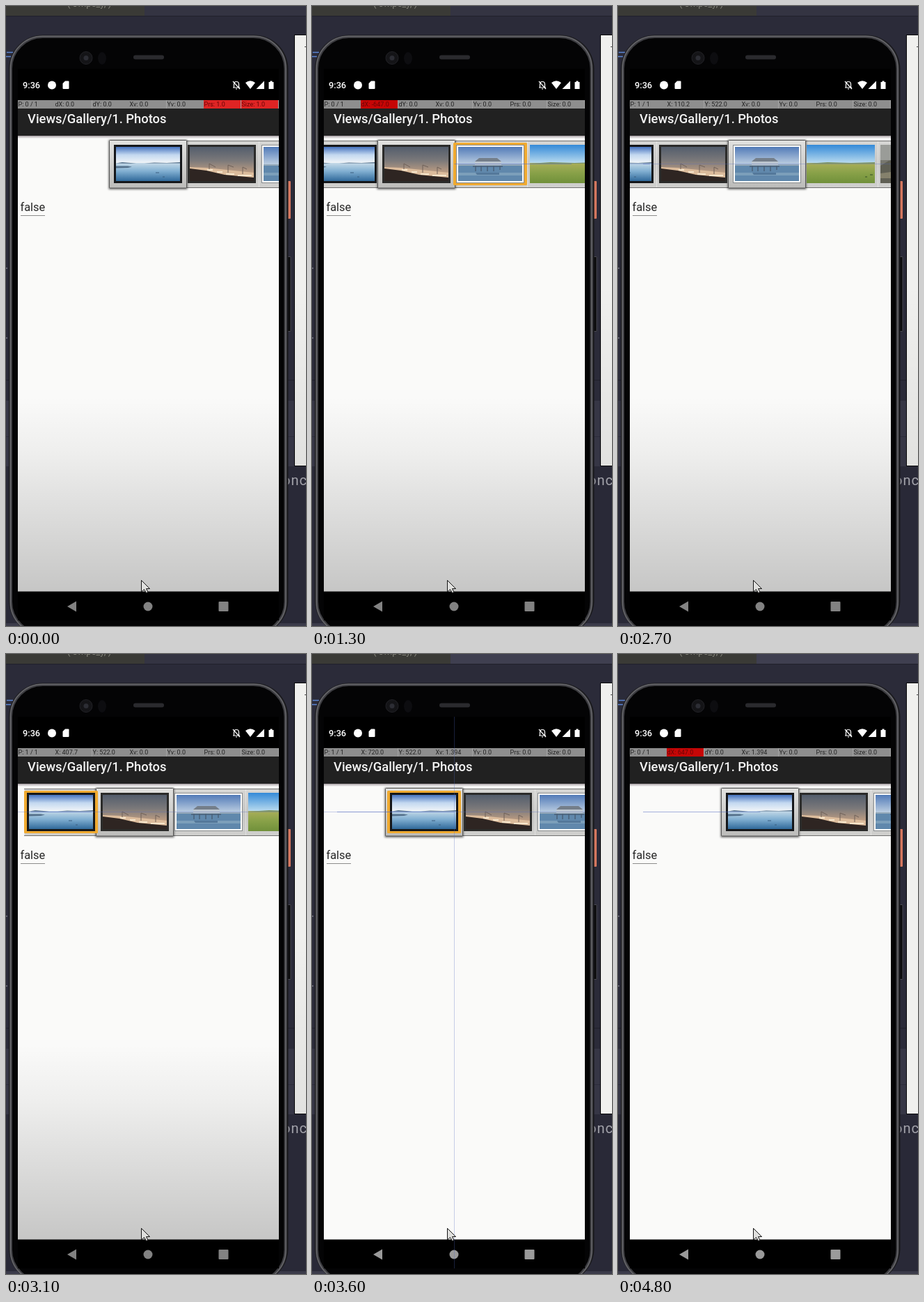
An HTML page that plays this animation: 431x889 px, repeating every 5000 ms.

```html
<!DOCTYPE html>
<html lang="en">
<head>
<meta charset="utf-8">
<title>Gallery swipe</title>
<style>
  html, body { margin: 0; width: 100%; height: 100%; overflow: hidden; background: #2b2b39; }
  svg { display: block; width: 431px; height: 889px; }
  text { font-family: Roboto, "Open Sans", sans-serif; }
  .medium { font-weight: 500; }
  .nav { fill: #828282; }
  .band { fill: #343442; }
  .flat .nav { fill: #9a9a9a; }
  .flat .band { fill: #3f3f50; }
  .flat .shade { opacity: 0; }
  .trace { stroke: #5068c0; stroke-width: 1; }
  .cross { opacity: .3; }
  #trail { opacity: .5; }
  #meter text { font-size: 9px; fill: #242424; }
  #meter .hot rect { fill: #c60606; }
  #meter .hot text { fill: #6a0505; }
  #meter .hot.soft rect { fill: #df2424; }
</style>
</head>
<body>
<svg id="stage" viewBox="0 0 431 889">
  <defs>
    <clipPath id="screen"><rect x="17" y="90" width="375" height="791"/></clipPath>
    <clipPath id="shot"><rect width="92" height="49" x="3" y="3"/></clipPath>
    <linearGradient id="dim" x2="0" y2="1">
      <stop stop-opacity="0"/>
      <stop offset=".29" stop-opacity=".048"/>
      <stop offset="1" stop-opacity=".208"/>
    </linearGradient>
    <linearGradient id="dim2" x2="0" y2="1">
      <stop stop-opacity="0"/><stop offset="1" stop-opacity=".06"/>
    </linearGradient>
    <linearGradient id="metal" x2="0" y2="1">
      <stop stop-color="#d6d6d4"/><stop offset=".5" stop-color="#c6c6c4"/><stop offset="1" stop-color="#d0d0ce"/>
    </linearGradient>
    <linearGradient id="raised" x2="0" y2="1">
      <stop stop-color="#e2e2e0"/><stop offset="1" stop-color="#bcbcba"/>
    </linearGradient>
    <linearGradient id="under" x2="0" y2="1">
      <stop stop-color="#a59da2"/><stop offset="1" stop-color="#fafaf9"/>
    </linearGradient>
    <linearGradient id="seaSky" x2="0" y2="1">
      <stop stop-color="#4673be"/><stop offset=".5" stop-color="#c3d8f0"/><stop offset="1" stop-color="#f0f4f7"/>
    </linearGradient>
    <linearGradient id="sea" x2="0" y2="1">
      <stop stop-color="#c6dae8"/><stop offset=".45" stop-color="#82b0d2"/><stop offset="1" stop-color="#30699a"/>
    </linearGradient>
    <linearGradient id="dusk" x2="0" y2="1">
      <stop stop-color="#535d6c"/><stop offset=".4" stop-color="#7b797a"/><stop offset=".75" stop-color="#bc9c82"/>
    </linearGradient>
    <linearGradient id="pierSky" x2="0" y2="1">
      <stop stop-color="#527bb8"/><stop offset="1" stop-color="#c4d4e4"/>
    </linearGradient>
    <linearGradient id="fieldSky" x2="0" y2="1">
      <stop stop-color="#348ad8"/><stop offset="1" stop-color="#c2e0f0"/>
    </linearGradient>
    <linearGradient id="field" x2="0" y2="1">
      <stop stop-color="#aaae5a"/><stop offset=".5" stop-color="#88a148"/><stop offset="1" stop-color="#70903a"/>
    </linearGradient>
    <filter id="blur" x="-20%" y="-20%" width="140%" height="140%"><feGaussianBlur stdDeviation="1.5"/></filter>

    <g id="p0">
      <rect width="98" height="55" fill="#15171a"/>
      <g clip-path="url(#shot)">
        <rect x="3" y="3" width="92" height="23" fill="url(#seaSky)"/>
        <rect x="3" y="26" width="92" height="26" fill="url(#sea)"/>
        <path d="M3 26.500l9-1.500 12 1 8 1zM44 26.500l14-1 18 .5 19-1v1.500zM3 30.500h17l6 1-6 1.500-17 .5z" fill="#54708a"/>
        <path d="M60 40h5M70 46h3" stroke="#3a5f80"/>
      </g>
    </g>
    <g id="p1">
      <rect width="98" height="55" fill="#2b2b2a"/>
      <g clip-path="url(#shot)">
        <rect x="3" y="3" width="92" height="49" fill="url(#dusk)"/>
        <path d="M3 32l24 1 68 7v12H3z" fill="#dcbc9c"/>
        <path d="M3 34l24 3 26 6 42 4v5H3z" fill="#2e2522"/>
        <path d="M31 37V27l9 5M58 40V29l8 3M79 42V32l6 3" fill="none" stroke="#6f6058"/>
        <path d="M28 36h8M42 39h8M55 42h12M72 44h20" stroke="#f6e6cc" stroke-width="2"/>
      </g>
    </g>
    <g id="p2">
      <rect x=".5" y=".5" width="97" height="54" fill="#fcfcfa" stroke="#85898c"/>
      <g clip-path="url(#shot)">
        <rect x="3" y="3" width="92" height="27" fill="url(#pierSky)"/>
        <rect x="3" y="29" width="92" height="23" fill="#6088ac"/>
        <path d="M3 28h92v2H3z" fill="#93a8b8"/>
        <path d="M3 40h92v4H3z" fill="#7c9fba"/>
        <path d="M27 24l6-5h26l6 5v5H27z" fill="#bcc6d0"/>
        <path d="M27 24l6-5h26l6 5z" fill="#747e8a"/>
        <path d="M24 31h43M28 30v8M36 30v8M45 30v8M54 30v8M63 30v6" stroke="#4a6078" stroke-width="1.5"/>
        <path d="M28 40h34v3H30z" fill="#54789a"/>
      </g>
    </g>
    <g id="p3">
      <rect width="98" height="28" fill="url(#fieldSky)"/>
      <rect y="26" width="98" height="29" fill="url(#field)"/>
      <path d="M0 27l30-2 34 1 34-1v2z" fill="#7d9468"/>
      <path d="M84 46h3M91 43h4" stroke="#4d6830" stroke-width="1.500"/>
    </g>
    <g id="p4">
      <rect width="98" height="55" fill="#77776f"/>
      <rect width="98" height="22" fill="#9a9c98"/>
      <path d="M0 30l12-7 14-4 14 8 58-4v32H0z" fill="#5f5f54"/>
      <path d="M0 41l30-4 68 3v8H0z" fill="#85816c"/>
    </g>
  </defs>

  <!-- desktop -->
  <rect width="431" height="889" fill="#2b2b39"/>
  <rect class="band" x="199" width="232" height="14"/>
  <rect width="199" height="14" fill="#3a3a36"/>
  <text x="88" y="1" font-size="13" fill="#85857c">( swipe_y, )</text>
  <path d="M0 14.500H431" stroke="#20202b"/>
  <path d="M0 536.500H431" stroke="#20202b"/>
  <rect y="566" width="431" height="94" fill="#363645"/>
  <path d="M0 617.500H431" stroke="#2c2c3a"/>
  <rect y="660" width="431" height="225" fill="#292937"/>
  <rect y="885" width="431" height="4" fill="#3b3b4a"/>
  <path d="M1 66.500h9M0 72.500h7" stroke="#5c86d4" stroke-width="1.500"/>
  <path d="M0 376h2M0 476h2" stroke="#9c9ca6"/>
  <rect x="414.500" y="41.500" width="20" height="618" fill="#f0f0ee" stroke="#08080a"/>
  <rect class="shade" x="415" y="400" width="16" height="259" fill="url(#dim2)"/>
  <path d="M429 58.500h2" stroke="#444"/>
  <text x="397" y="687" font-size="20" letter-spacing="1" fill="#a2a2aa">onc</text>

  <!-- phone -->
  <rect x="404" y="251" width="5" height="54" rx="1" fill="#d5775f"/>
  <rect x="404" y="359.500" width="5" height="107" rx="1" fill="#0b0b0d" stroke="#4b4b52"/>
  <rect x="4" y="41.500" width="401.500" height="860" rx="49" fill="#19191c"/>
  <rect x="7" y="44" width="394.500" height="856" rx="46" fill="#040405" stroke="#3c3c40" stroke-width="4"/>
  <rect x="6.500" y="43.500" width="395.500" height="857" rx="46" fill="none" stroke="#67676b" stroke-width="1.500"/>
  <circle cx="115" cy="74.500" r="9" fill="#141417" stroke="#232327"/>
  <circle cx="115" cy="74.500" r="3.500" fill="#2c2d34"/>
  <ellipse cx="138" cy="75" rx="6" ry="9" fill="#0d0d10"/>
  <rect x="183" y="70.500" width="44" height="6" rx="3" fill="#2a2a2e"/>

  <g clip-path="url(#screen)">
    <rect x="17" y="90" width="375" height="791"/>
    <text class="medium" x="24" y="118" font-size="12.760" fill="#fff">9:36</text>
    <g fill="#fff">
      <circle cx="66" cy="113.500" r="6"/>
      <path d="M85 107.500h4.500q1 0 1 1v9.500q0 1-1 1h-7q-1 0-1-1v-7z"/>
      <path d="M344 110q7-5.500 14 0l-7 9z"/>
      <path d="M371 107.500v11.500h-11.500z"/>
      <path d="M377.500 109h2v-1.500h3v1.500h2v10h-7z"/>
    </g>
    <path d="M327.500 117v-5q0-3.500 3.500-3.500t3.500 3.500v5zM326 117h10M330 119h2M326 108l10 11" fill="none" stroke="#fff" stroke-width="1.200"/>

    <!-- app -->
    <rect x="17" y="135" width="375" height="52" fill="#212121"/>
    <text class="medium" x="31" y="167.700" font-size="18.350" fill="#f4f4f4">Views/Gallery/1. Photos</text>
    <rect x="17" y="187" width="375" height="653" fill="#fafaf9"/>
    <rect x="17" y="186" width="375" height="4" fill="url(#under)"/>
    <rect class="shade" x="17" y="560" width="375" height="280" fill="url(#dim)"/>
    <g id="strip">
      <g id="cells"></g>
      <g id="frame">
        <rect x="147.500" y="192" width="113" height="71" fill="#000" opacity=".55" filter="url(#blur)"/>
        <rect x="148.500" y="192.500" width="111" height="68.500" rx="1" fill="url(#raised)" stroke="#555"/>
      </g>
      <rect id="press" x="151" y="196" width="106" height="61" rx="1.500" fill="#f0aa30"/>
      <g id="photos"></g>
    </g>
    <text x="20.500" y="293.500" font-size="16.400" fill="#262626">false</text>
    <path d="M21 300.500H56" stroke="#8c8c8c"/>

    <rect x="17" y="839.500" width="375" height="42"/>
    <path class="nav" d="M88 861l13-7.500v15z"/>
    <circle class="nav" cx="204" cy="861" r="6.500"/>
    <rect class="nav" x="305.500" y="854" width="14" height="14" rx="1"/>

    <!-- pointer overlay -->
    <rect x="17" y="135" width="375" height="12" fill="#a2a2a2"/>
    <g id="meter"></g>
    <path class="trace cross" id="row" d="M17 226.500H392"/>
    <path class="trace cross" id="column" d="M.5 90V881"/>
    <path class="trace" id="trail"/>
  </g>
  <path d="M194.500 823.500v16.500l4-3.500 3 5 2.500-1-2.500-5h5z" fill="#e0e0de" stroke="#151515"/>
</svg>

<script>
const $ = id => document.getElementById(id);
const LOOP = 5000, STEP = 100, PITCH = 106, DRAG = 870, TAU = 80;
const PX = 375 / 1440;

// One swipe: device x, strip travel, and the photo under the finger.
const swipes = [
  { start: 350, release: 1300, from: 1367, dx: -647, a: 0, b: -160, rest: -212, photo: 2, xv: '0.0' },
  { start: 2650, release: 3700, from: 73, dx: 647, a: -212, b: -43.5, rest: 0, photo: 0, xv: '1.394' }
];

const toScreen = x => 17 + x * PX;
const shiftTo = (el, x) => el.setAttribute('transform', `translate(${x.toFixed(2)} 0)`);
const show = (el, on) => el.setAttribute('visibility', on ? 'visible' : 'hidden');

for (let i = 0; i < 5; i++) {
  const x = 151 + i * PITCH;
  $('cells').innerHTML += `<rect x="${x}" y="193" width="${PITCH}" height="68" fill="url(#metal)"/>
    <path d="M${x} 193.500h${PITCH}M${x} 260.500h${PITCH}" stroke="#707070"/>
    <path d="M${x + .5} 194v66" stroke="#eee" opacity=".6"/>`;
  $('photos').innerHTML += `<use href="#p${i}" x="${155 + i * PITCH}" y="199"/>`;
}

for (let i = 0; i < 7; i++) {
  const x = Math.floor(17 + i * 53.5);
  $('meter').innerHTML += `<g><rect x="${x}" y="135" width="53" height="12" fill="#8e8e8e"/><text x="${x + .5}" y="144"></text></g>`;
}
const fields = [...$('meter').children];

function setMeter(values, hot) {
  fields.forEach((f, i) => {
    f.lastChild.textContent = values[i];
    f.setAttribute('class', hot.includes(i) ? (i > 4 ? 'hot soft' : 'hot') : '');
  });
}

function draw(t) {
  const s = swipes.filter(w => t > w.start).pop();
  let shift = 0;
  if (!s) {
    setMeter(['P: 0 / 1', 'dX: 0.0', 'dY: 0.0', 'Xv: 0.0', 'Yv: 0.0', 'Prs: 1.0', 'Size: 1.0'], [5, 6]);
    $('trail').setAttribute('d', '');
    ['row', 'column', 'press'].forEach(id => show($(id), false));
  } else {
    const p = Math.min(1, (t - s.start) / DRAG);
    const down = t < s.release;
    const x = s.from + s.dx * p;
    shift = down ? s.a + (s.b - s.a) * p
                 : s.rest + (s.b - s.rest) * Math.exp((s.release - t) / TAU);
    const xv = p < 1 ? '0.0' : s.xv;
    setMeter([
      `P: ${down ? 1 : 0} / 1`,
      down ? `X: ${x.toFixed(1)}` : `dX: ${s.dx.toFixed(1)}`,
      down ? 'Y: 522.0' : 'dY: 0.0',
      `Xv: ${xv}`, 'Yv: 0.0', 'Prs: 0.0', 'Size: 0.0'
    ], down ? [] : [1]);
    $('trail').setAttribute('d', `M${toScreen(s.from)} 226.500H${toScreen(x)}`);
    show($('row'), down);
    show($('column'), down && p === 1);
    shiftTo($('column'), Math.floor(toScreen(x)));
    show($('press'), t >= s.start + 100 && t < s.release + 100);
    shiftTo($('press'), s.photo * PITCH);
  }
  shiftTo($('strip'), Math.round(shift));
  shiftTo($('frame'), Math.round(-shift / PITCH - .02) * PITCH);
  const flat = (t >= 3200 && t < 3800) || t >= 4200;
  $('stage').setAttribute('class', flat ? 'flat' : '');
}

const began = performance.now();
function tick() {
  const t = (performance.now() - began) % LOOP;
  draw(Math.floor(t / STEP) * STEP);
  requestAnimationFrame(tick);
}
tick();
</script>
</body>
</html>
```
